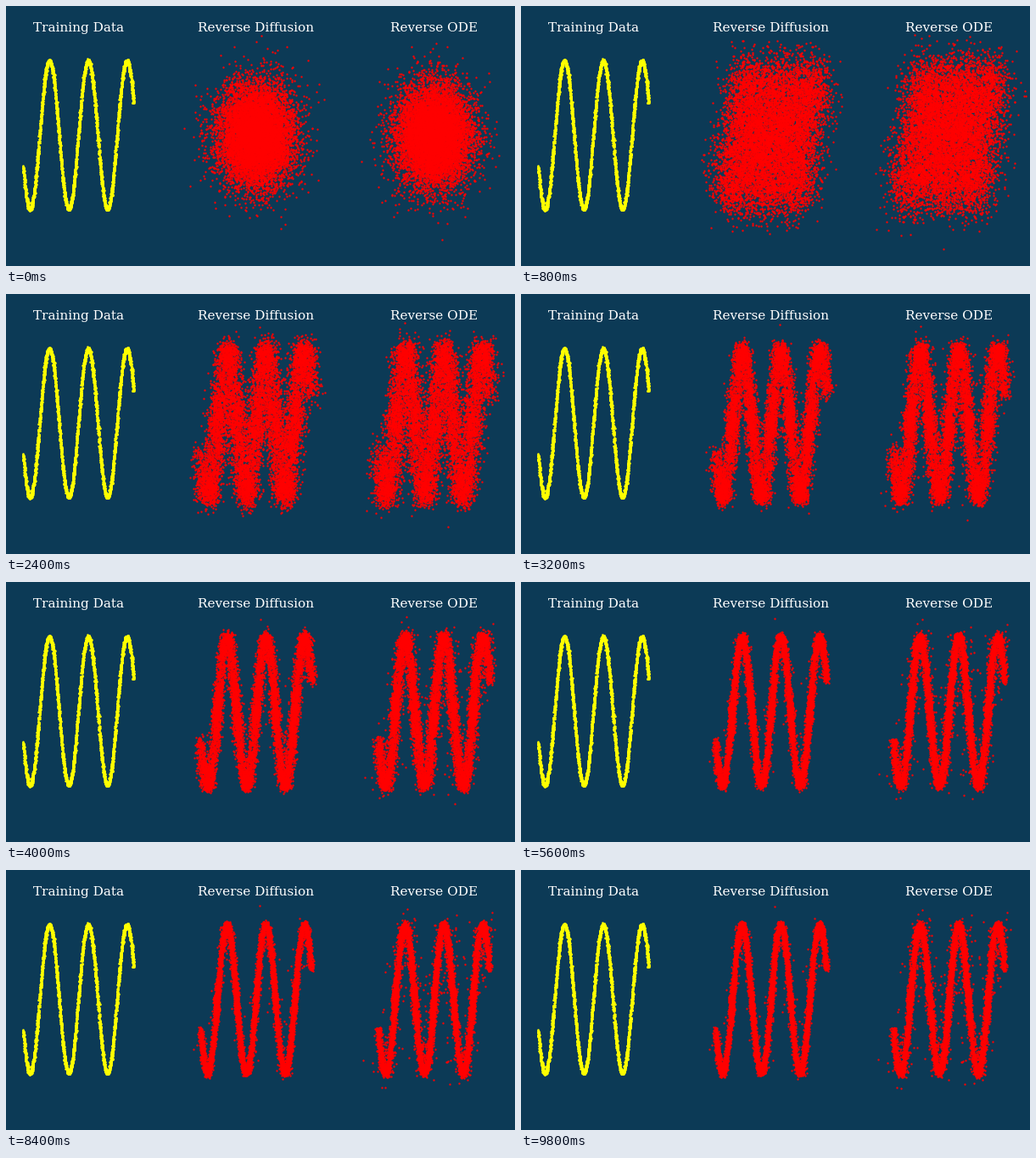
These frames come from a looping animation (600 by 306 pixels, 9.9 s). A matplotlib script:

```python
import numpy as np
import matplotlib.pyplot as plt
from matplotlib.animation import FuncAnimation

W, H, DPI = 600, 306, 100
FRAMES, INTERVAL = 99, 100
N = 10000
MID_Y = 151.8
UNIT = np.array([21.8, 29.1])  # pixels per unit of noise
KEYS = [0, 8, 16, 24, 40, 56, 75, 98]
SPREAD = [1, 0.62, 0.38, 0.27, 0.11, 0.05, 0.02, 0.004]

rng = np.random.default_rng(7)


def wave(n, even=0.0):
    """Points on a sine wave, scaled to +-3; even thins out the bends."""
    u = rng.uniform(-9, 9, n) * (1 - 0.1 * even)
    t = u - even * np.sin(2 * u)
    return np.column_stack([t / 3, 3 * np.sin(t)])


def strays(data, share, size):
    """Lasting errors: a few loose points, and filling inside the bends."""
    off = rng.normal(0, size, data.shape) * (rng.random((N, 1)) < share)
    bend = (np.abs(data[:, 1]) > 2.5) & (rng.random(N) < 6 * share)
    inward = -np.sign(data[:, 1]) * rng.exponential(1.3 * size, N)
    off[:, 1] += bend * inward
    off[:, 0] += bend * rng.normal(0, 0.5 * size, N)
    return off


def noise_walk(keep):
    """Unit noise for every step; keep = 1 leaves it fixed."""
    z = rng.normal(size=(N, 2))
    for _ in range(FRAMES):
        yield z
        z = keep * z + np.sqrt(1 - keep**2) * rng.normal(size=(N, 2))


def to_pixels(points, mid_x):
    p = points * UNIT * [1, -1] + [mid_x, MID_Y]
    return p.astype(np.float32)


def reverse_path(mid_x, keep, floor, share, size):
    data = wave(N, even=0.25)
    goal = data + rng.normal(0, floor, data.shape) + strays(data, share, size)
    spread = np.exp(np.interp(np.arange(FRAMES), KEYS, np.log(SPREAD)))
    return [to_pixels((1 - s**3) * goal + s * z, mid_x)
            for s, z in zip(spread, noise_walk(keep))]


fig = plt.figure(figsize=(W / DPI, H / DPI), dpi=DPI, facecolor="#0c3a56")
ax = fig.add_axes([0, 0, 1, 1])
ax.set_xlim(0, W)
ax.set_ylim(H, 0)
ax.axis("off")

for x, title in [(85.5, "Training Data"), (295, "Reverse Diffusion"),
                 (504.5, "Reverse ODE")]:
    ax.text(x, 30.2, title, color="white", fontsize=11,
            family="DejaVu Serif", ha="center", va="baseline")


def dots(color, size):
    return ax.plot([], [], "o", ms=size, mew=0, color=color)[0]


train = dots("#ffff00", 1.9)
curve = wave(4000) + rng.normal(0, 0.026, (4000, 2))
train.set_data(*to_pixels(curve, 85.4).T)

paths = [reverse_path(294.6, 0.9, 0.07, 0.012, 0.22),
         reverse_path(504.4, 1.0, 0.08, 0.026, 0.36)]
clouds = [dots("#ff0000", 1.7) for _ in paths]


def draw(i):
    for cloud, path in zip(clouds, paths):
        cloud.set_data(*path[i].T)
    return clouds


anim = FuncAnimation(fig, draw, frames=FRAMES, interval=INTERVAL,
                     init_func=lambda: draw(0), repeat=True, repeat_delay=0)
plt.show()
```
